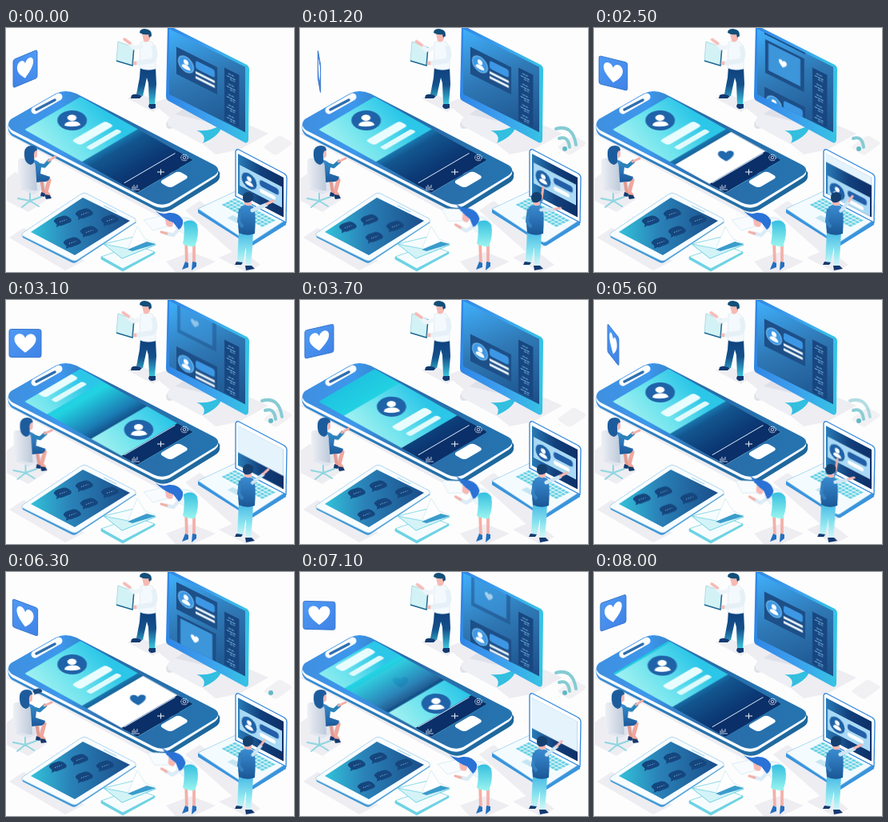
Animation of 360 by 305 pixels, one loop 8100 ms. Source, as an HTML page:

```html
<!DOCTYPE html>
<html lang="en">
<head>
<meta charset="utf-8">
<title>Connected devices</title>
<style>
html, body { margin: 0; width: 100%; height: 100%; overflow: hidden; background: #fdfdfd; }
svg { display: block; width: 100vw; height: 100vh; }
.m { animation: 4.05s linear infinite; }
.phone { animation-name: phone; }
.post { animation-name: post; }
.feed { animation-name: feed; }
.feed-post { animation-name: feed-post; }
.page { animation-name: page; }
.chat { animation-name: chat; }
.last { animation-name: last; transform-box: fill-box; transform-origin: center; }
.sitter { animation-name: sitter; }
.typing { animation-name: typing; transform-origin: 38px 172px; }
.worker { animation-name: worker; }
.reach { animation-name: reach; transform-origin: 310px 228px; }
.raise { animation-name: raise; }
.bend { animation-name: bend; transform-origin: 229px 252px; }
.swipe { animation-name: swipe; }
.dot { animation-name: dot; }
.mid { animation-name: mid; }
.out { animation-name: out; }
@keyframes phone {
  0%, 64% { transform: none; }
  91.4% { transform: translateY(-135px); }
  97.5% { transform: translateY(-176px); }
  100% { transform: translateY(-180px); }
}
@keyframes post {
  0%, 38% { transform: translateY(66px); opacity: 0; }
  39% { transform: translateY(66px); opacity: 1; }
  52%, 66% { transform: none; opacity: 1; }
  76%, 100% { transform: none; opacity: 0; }
}
@keyframes feed {
  0%, 49% { transform: none; }
  55.6% { transform: translateY(-11px); }
  61.7% { transform: translateY(-50px); }
  91.4% { transform: translateY(-81px); }
  97.5% { transform: translateY(-99px); }
  100% { transform: translateY(-100px); }
}
@keyframes feed-post {
  0%, 48% { opacity: 0; }
  53%, 70% { opacity: 1; }
  82%, 100% { opacity: 0; }
}
@keyframes page {
  0%, 10% { transform: none; }
  20% { transform: translateY(54px); opacity: 1; }
  20.1%, 22% { transform: translateY(54px); opacity: 0; }
  22.1% { transform: translateY(54px); opacity: 1; }
  29% { transform: translateY(-3px); }
  40%, 57% { transform: none; }
  61.7% { transform: translateY(13px); }
  72% { transform: translateY(54px); }
  86%, 100% { transform: none; }
}
@keyframes chat {
  0%, 5%, 61.7%, 100% { transform: none; }
  18%, 42% { transform: translate(-11px, 7.5px); }
  55.6% { transform: translate(-6px, 2px); }
}
@keyframes last {
  0%, 5%, 61.7%, 100% { transform: none; }
  18%, 42% { transform: scale(0); }
  55.6% { transform: scale(.55); }
}
@keyframes sitter {
  0%, 100% { transform: translateX(6px); }
  20%, 75% { transform: none; }
  91.4%, 97.5% { transform: translateX(5px); }
}
@keyframes typing {
  0%, 91.4%, 100% { transform: rotate(-7deg); }
  20%, 75% { transform: none; }
}
@keyframes worker {
  0%, 8%, 50%, 100% { transform: none; }
  18%, 38% { transform: translateX(-7px); }
}
@keyframes reach {
  0%, 7%, 92%, 100% { transform: none; }
  18%, 35% { transform: rotate(20deg) scale(.85); }
  53%, 66% { transform: rotate(-27deg) scale(.82); }
}
@keyframes raise {
  0%, 10%, 45%, 100% { opacity: 0; }
  16%, 38% { opacity: 1; }
}
@keyframes bend {
  0%, 23%, 61%, 82%, 97%, 100% { transform: none; }
  29%, 56%, 91.4% { transform: rotate(15deg); }
}
@keyframes swipe {
  0%, 58%, 100% { transform: none; }
  25%, 91.4% { transform: translate(-3px, 3px); }
}
@keyframes dot {
  0%, 5%, 45%, 50%, 82%, 100% { opacity: 0; }
  9%, 40%, 55%, 77% { opacity: 1; }
}
@keyframes mid {
  0%, 10%, 44%, 57%, 82%, 100% { opacity: 0; }
  15%, 38%, 61.5%, 77% { opacity: 1; }
}
@keyframes out {
  0%, 15%, 42%, 65%, 82%, 100% { opacity: 0; }
  20%, 36%, 70%, 77% { opacity: 1; }
}
</style>
</head>
<body>
<svg viewBox="0 0 360 305" preserveAspectRatio="none">
<defs>
  <linearGradient id="bezel"><stop stop-color="#3f8fe0"/><stop offset=".25" stop-color="#3d97ec"/><stop offset=".5" stop-color="#2a6ca8"/><stop offset="1" stop-color="#2474b0"/></linearGradient>
  <linearGradient id="side"><stop stop-color="#3a8fd8"/><stop offset=".4" stop-color="#2a76b0"/><stop offset="1" stop-color="#1c6599"/></linearGradient>
  <linearGradient id="glass" x2="0" y2="1"><stop stop-color="#1fc3e0"/><stop offset=".25" stop-color="#22d3e2"/><stop offset=".5" stop-color="#1b7cb4"/><stop offset=".58" stop-color="#13568f"/><stop offset=".8" stop-color="#0c3a76"/><stop offset="1" stop-color="#082a60"/></linearGradient>
  <linearGradient id="head" y2=".35"><stop stop-color="#a2f1f0"/><stop offset=".45" stop-color="#6ee3ee"/><stop offset="1" stop-color="#2bc6e8"/></linearGradient>
  <linearGradient id="mon" y2="1"><stop stop-color="#40b0fc"/><stop offset=".45" stop-color="#2f79b6"/><stop offset="1" stop-color="#1a4f88"/></linearGradient>
  <linearGradient id="rim"><stop stop-color="#2f86e6"/><stop offset=".5" stop-color="#3d9fee"/><stop offset="1" stop-color="#35c4e4"/></linearGradient>
  <linearGradient id="tab"><stop stop-color="#32c2da"/><stop offset=".4" stop-color="#2a82b8"/><stop offset="1" stop-color="#1a4d8a"/></linearGradient>
  <linearGradient id="cloth" x2="0" y2="1"><stop stop-color="#0f3f7c"/><stop offset=".5" stop-color="#14518c"/><stop offset="1" stop-color="#3cc4dc"/></linearGradient>
  <linearGradient id="pants" x2="0" y2="1"><stop stop-color="#45b8e6"/><stop offset=".6" stop-color="#8fe6f0"/><stop offset="1" stop-color="#d6f8fa"/></linearGradient>
  <linearGradient id="coat" x2="0" y2="1"><stop stop-color="#3a8cd2"/><stop offset="1" stop-color="#1a5796"/></linearGradient>
  <linearGradient id="aqua" x2="0" y2="1"><stop stop-color="#35bfe0"/><stop offset="1" stop-color="#9af5ef"/></linearGradient>
  <linearGradient id="seat"><stop stop-color="#eef0f5"/><stop offset="1" stop-color="#bcc9da"/></linearGradient>
  <linearGradient id="lap"><stop stop-color="#2a7cb8"/><stop offset=".5" stop-color="#12407c"/><stop offset="1" stop-color="#0d2f66"/></linearGradient>
  <linearGradient id="card" x2="1" y2="1"><stop stop-color="#4f9af4"/><stop offset="1" stop-color="#3f82e6"/></linearGradient>
  <clipPath id="phoneClip"><rect width="100" height="200" rx="3"/></clipPath>
  <clipPath id="monClip"><rect width="95" height="82"/></clipPath>
  <clipPath id="lapClip"><rect width="57" height="50"/></clipPath>
  <path id="heart" d="M0 9C-5 5-10 1-10-4C-10-10-2-11 0-5C2-11 10-10 10-4C10 1 5 5 0 9Z"/>
  <g id="person"><circle cy="-2.600" r="3.100"/><path d="M-5.500 5Q-5 .8 0 .8T5.500 5Q0 7.500-5.500 5Z"/></g>
  <g id="user"><circle r="10" fill="#1f62a8"/><use href="#person" fill="#fff"/></g>
  <g id="bubble"><path d="M-11 0Q-12-2-7-5L1-7.500Q5-8 7-6L10-3.500Q12-1 9 1L0 4.500Q-2 5.500-4 5L-8 7L-7.500 3.500Z" fill="#15467e"/><path d="M-4 .5L4.500-2.500" stroke="#7fb8e4" stroke-dasharray="1.300 1.500"/></g>
  <path id="menu" d="M3 0h7M1 3.500h11M5 6h6" stroke="#7cc4ee" stroke-width=".9" stroke-dasharray="3 .8"/>
</defs>

<!-- ground shadows -->
<g fill="#ededf2">
  <path d="M1 188L12 180L52 214L28 230L1 216Z"/>
  <path d="M4 262L22 250L98 291L74 303Z"/>
  <path d="M152 88L164 80L196 96L184 105Z"/>
  <path d="M183 94L212 84L310 124L328 132L292 152L262 158Z"/>
  <path d="M224 228L242 216L316 268L286 283Z"/>
  <path d="M200 292L232 280L262 292L234 305H212Z"/>
  <path d="M266 287L292 276L318 296L300 305Z"/>
  <path d="M0 132L70 96L212 222L192 236Z"/>
  <path d="M324 147L339 136Q342 134 346 136L356 142Q359 144 355 147L341 157Q337 160 333 157L324 151Q321 149 324 147Z" fill="#f1f1f4"/>
</g>

<!-- turning card -->
<g id="turn">
  <rect x="-20" y="-17.500" width="40" height="35" rx="2.500" fill="url(#card)" stroke="#3876cc" vector-effect="non-scaling-stroke"/>
  <use href="#heart" transform="scale(1.350 1.300)" fill="#fff"/>
</g>

<!-- monitor -->
<path d="M222 101L262 119L256 132Q235 122 203 126Q196 120 206 112Z" fill="#dfe1e9"/>
<path d="M203 122Q198 113 212 108L246 116L270 122L257 143Q250 148 243 144Z" fill="#eeeff4"/>
<path d="M238 128Q254 130 270 121Q269 134 246 144Q252 134 238 128Z" fill="#32bfe0"/>
<path d="M202-4L301 46Q304 48 304 52L303 140Q302 145 298 143L203 91Q200 89 200 85Z" fill="url(#rim)"/>
<g transform="matrix(1 .5 0 1 204 1)" clip-path="url(#monClip)">
  <rect width="95" height="82" fill="url(#mon)"/>
  <g class="m feed">
    <g id="profile">
      <rect x="9" y="18" width="51" height="34" fill="#1d4f88"/>
      <circle cx="21" cy="34" r="9.500" fill="#3d97e4" stroke="#7cc6f4"/>
      <use href="#person" x="21" y="34" fill="#fff"/>
      <rect x="33" y="23" width="24" height="10" rx="3" fill="#3d97e4"/>
      <path d="M33 38H57M33 44H57" stroke="#f2faff" stroke-width="3.200"/>
    </g>
    <use href="#profile" y="100"/>
    <g class="m feed-post">
      <rect x="10" y="58" width="49" height="42" fill="#1d4f88"/>
      <rect x="14" y="61" width="40" height="34" fill="#3d95da"/>
      <use href="#heart" transform="translate(32 78) scale(.5)" fill="#fff"/>
    </g>
  </g>
  <rect x="69" y="14" width="18" height="66" fill="#184680"/>
  <g transform="translate(71 19)">
    <use href="#menu"/><use href="#menu" y="13"/><use href="#menu" y="26"/><use href="#menu" y="39"/><use href="#menu" y="52"/>
  </g>
</g>

<!-- man with a sheet -->
<path d="M168 48L187 49L188 70L186 95L179 95L178 69L176 62L171 85L163 83L167 62Z" fill="url(#cloth)"/>
<path d="M157 84Q162 81 170 85L167 88H156ZM179 95L187 95V100Q180 103 178 98Z" fill="#123a72"/>
<path d="M168 18Q175 14 183 18Q188 23 187 51Q176 54 167 50Z" fill="#f3f9fd" stroke="#d3e2ee" stroke-width=".6"/>
<path d="M184 22Q189 36 183 41L162 44" fill="none" stroke="#e6f0f7" stroke-width="6" stroke-linejoin="round"/>
<path d="M140 17L160 24L158 47L138 41Z" fill="#d3f2f5" stroke="#9fd3de" stroke-width=".8"/>
<path d="M160 24L158 47L138 41" fill="none" stroke="#1f6a94" stroke-width="1.500"/>
<circle cx="161" cy="44" r="2.500" fill="#f6b9b4"/>
<g class="m swipe">
  <path d="M171 22L160 25L153 18" fill="none" stroke="#edf5fa" stroke-width="5" stroke-linejoin="round"/>
  <path d="M155 19L148 14" stroke="#f6b9b4" stroke-width="3.500" stroke-linecap="round"/>
</g>
<path d="M170 7H180V14Q176 20 172 16Z" fill="#f6b9b4"/>
<path d="M167 6Q167 1 174 1Q183 2 182 10L179 12L178 8Q172 9 167 6Z" fill="#124e78"/>

<!-- signal -->
<g fill="none" stroke="#86cbd4" stroke-width="4" stroke-linecap="round">
  <circle class="m dot" cx="331" cy="151" r="3" fill="#62b8c6" stroke="none"/>
  <path class="m mid" d="M324 138Q335 134 337 149"/>
  <path class="m out" d="M320 126Q341 120 345 146"/>
</g>

<!-- phone -->
<path d="M5 120L62 88L260 177Q269 178 267 184Q268 190 261 194L207 227Q196 233 184 226L8 135Q1 130 3 120Z" fill="url(#side)"/>
<path d="M6 117L62 85Q74 79 88 85L260 174Q270 180 261 187L207 221Q196 228 184 222L8 132Q-1 125 6 117Z" fill="#f8fcff"/>
<path d="M6 114L62 82Q74 76 88 82L260 171Q270 177 261 184L207 217Q196 224 184 218L8 128Q-1 121 6 114Z" fill="url(#bezel)"/>
<path d="M36 103L66 86" stroke="#fdfdfd" stroke-width="9" stroke-linecap="round"/>
<path d="M38 102L61 90" stroke="#2f6fb0" stroke-width="3.500" stroke-linecap="round"/>
<g transform="matrix(.7 -.41 .705 .395 23 127)">
  <rect x="36" y="203" width="34" height="20" rx="6" fill="#fff"/>
  <g clip-path="url(#phoneClip)">
    <rect width="100" height="200" fill="url(#glass)"/>
    <g class="m phone">
      <g id="account">
        <rect width="100" height="102" fill="url(#head)"/>
        <use href="#user" transform="translate(56 29) rotate(43) scale(1.850 2.200)"/>
        <rect x="24" y="60" width="60" height="15" rx="5" fill="#e9fdff"/>
        <rect x="26" y="83" width="56" height="9" rx="3" fill="#e0fafc"/>
      </g>
      <use href="#account" y="180"/>
      <g class="m post">
        <rect y="111" width="100" height="62" fill="#fff"/>
        <use href="#heart" transform="translate(58 144) rotate(43) scale(1 1.300)" fill="#1f68ad"/>
      </g>
    </g>
    <rect y="172" width="100" height="28" fill="#0b2f68"/>
    <path d="M4 173H95" stroke="#d8eaff" stroke-width="1.300"/>
  </g>
</g>
<g fill="none" stroke="#eaf4ff">
  <path d="M189 180H198M193.500 176.500V183.500"/>
  <path d="M158 201V198M160 201V196M162 201V198M164 200V196M157 202H167" stroke-width=".8"/>
  <ellipse cx="223" cy="162" rx="4.300" ry="3.800" stroke-dasharray="2 .8"/><circle cx="223" cy="162" r="1.800" stroke-width=".8"/>
</g>

<!-- woman on a chair -->
<g class="m sitter">
  <g fill="none" stroke="#8ed6e0" stroke-width="2" stroke-linecap="round">
    <path d="M24 205V216M24 216L9 213M24 216L38 211M24 216L14 224M24 216L35 223"/>
  </g>
  <path d="M20 190L41 190L45 200L28 208L12 201Z" fill="#dfe5ee"/>
  <path d="M34 186L48 190L44 205L48 210" fill="none" stroke="#f0a79c" stroke-width="5" stroke-linejoin="round"/>
  <path d="M38 187L41 207" stroke="#e39a92" stroke-width="4"/>
  <path d="M42 208L49 209L51 213L44 214ZM38 205L43 207L42 211L37 210Z" fill="#14396f"/>
  <path d="M26 165Q36 164 38 174L37 182L49 186Q48 193 40 192L25 194Z" fill="url(#coat)"/>
  <path d="M9 166Q10 162 16 163L27 166Q31 168 31 174L33 203Q24 204 14 198Q10 196 9 190Z" fill="url(#seat)"/>
  <g class="m typing">
    <path d="M33 170L42 173L50 166" fill="none" stroke="#2a82ba" stroke-width="4.500" stroke-linejoin="round"/>
    <path d="M48 167L57 163" stroke="#f3b0a8" stroke-width="3" stroke-linecap="round"/>
  </g>
  <path d="M25 151H33V160Q30 165 26 161Z" fill="#f6b9b4"/>
  <path d="M17 155Q18 147 26 147Q33 147 33 153Q28 153 29 162Q31 169 25 171Q16 169 17 155Z" fill="#1d5c9c"/>
</g>

<!-- tablet -->
<path d="M20 259L96 211L163 243L89 292Q86 295 82 293L21 262Z" fill="#3d97d4"/>
<path d="M21 256L93 208Q97 205 101 207L161 238Q164 241 161 243L89 290Q86 292 82 290L21 260Q18 258 21 256Z" fill="#f7fcff" stroke="#9ecbe9" stroke-width=".8"/>
<path d="M31 255L96 212L155 241L86 284Z" fill="url(#tab)"/>
<path d="M122 222L138 230" stroke="#a9d7ee" stroke-width="1.300"/>
<g class="m chat">
  <use href="#bubble" x="71" y="242"/><use href="#bubble" x="98" y="233"/>
  <use href="#bubble" x="104" y="255"/><use href="#bubble" x="130" y="241"/>
  <use href="#bubble" class="m last" x="83" y="269"/>
</g>

<!-- letters -->
<g stroke="#6fd2e4" stroke-width=".8" fill="#f6fcfd">
  <path d="M119 286L162 271L186 280L146 301Z"/>
  <path d="M119 286L146 301L186 280V282L146 304L119 289Z" fill="#6ad3e4"/>
  <path d="M122 270L164 260L187 271L145 288Z"/>
  <path d="M122 270L158 277L187 271L145 288Z" fill="#d3f3f7"/>
  <path d="M164 248L174 264L187 269L152 277Z" fill="#fff" stroke="#cdeaf0"/>
  <path d="M152 277L176 267L187 270L158 279Z" fill="#3a9ccc" stroke="none"/>
</g>

<!-- woman bending -->
<path d="M225 264L226 296M235 264L235 296" stroke="#f3b0a8" stroke-width="3.800"/>
<path d="M224 292L228 294L228 299L220 302ZM233 292L238 293L238 298L232 303Z" fill="#2370c0"/>
<g class="m bend">
  <path d="M172 240L194 235L205 247L184 253Z" fill="#f8fcfe" stroke="#d5e8f0" stroke-width=".8"/>
  <path d="M214 238Q230 234 238 244L236 256L222 257L212 250Z" fill="#eef7fc" stroke="#c9dfea" stroke-width=".6"/>
  <path d="M219 248L209 259L198 256" fill="none" stroke="#dcebf5" stroke-width="4.500" stroke-linejoin="round"/>
  <path d="M201 257L194 255" stroke="#f3b0a8" stroke-width="3" stroke-linecap="round"/>
  <path d="M199 238L210 240L208 248Q203 250 200 246Z" fill="#f6b9b4"/>
  <path d="M187 229Q196 234 203 231Q216 230 221 240Q222 248 216 252L209 243Q199 240 187 229Z" fill="#2a72d6"/>
</g>
<path d="M222 243Q233 237 239 246Q242 258 236 273Q228 274 221 270Q224 256 222 243Z" fill="url(#aqua)"/>

<!-- laptop -->
<path d="M240 227L286 206L350 241V246L308 272Q305 273 302 270L240 231Z" fill="#3a94dc"/>
<path d="M240 226L287 204L351 239L308 267Q305 269 302 267Z" fill="#f4fbff" stroke="#8ec8e8" stroke-width=".7"/>
<path d="M287 154Q288 151 291 152L348 182Q351 184 351 188L350 243L287 210Z" fill="#fff" stroke="#2f86dc" stroke-width="1.300"/>
<g transform="matrix(1 .52 0 1 290 157)" clip-path="url(#lapClip)">
  <rect width="57" height="50" fill="url(#lap)"/>
  <g class="m page">
    <rect y="-54" width="57" height="51" fill="#e4f3fc"/>
    <rect x="2" y="13" width="53" height="26" fill="#a9d9f4"/>
    <use href="#user" transform="translate(14 27) scale(.95)"/>
    <rect x="27" y="18" width="24" height="8" rx="3.500" fill="#235fa8"/>
    <rect x="27" y="29" width="20" height="5" rx="2.500" fill="#fff"/>
  </g>
</g>
<g transform="matrix(.86 .47 -.86 .43 286 211)" fill="none" stroke="#62cfe2" stroke-width="3.800" stroke-dasharray="4 1">
  <path d="M2 4H62M2 9H62M2 14H62M2 19H62"/>
  <path d="M24 31H41" stroke="#c4e6f2" stroke-width="8" stroke-dasharray="none"/>
</g>

<!-- man at the laptop -->
<g class="m worker">
  <path d="M291 254H309L308 274L306 298H300L300 273L296 294H289Z" fill="url(#pants)"/>
  <path d="M288 292L296 293L294 296L286 296ZM299 297H307L311 301L300 303Z" fill="#14396f"/>
  <g class="m raise">
    <path d="M302 226L309 213" stroke="#4a90d0" stroke-width="5"/>
    <path d="M309 213L311 199" stroke="#f3b0a8" stroke-width="3" stroke-linecap="round"/>
  </g>
  <path d="M294 223Q301 219 309 223Q313 228 311 257Q301 261 291 256Q288 232 294 223Z" fill="url(#coat)"/>
  <path d="M293 226L291 242L296 249" fill="none" stroke="#3480c0" stroke-width="4" stroke-linejoin="round"/>
  <g class="m reach">
    <path d="M308 228L325 221" stroke="#cfe6f4" stroke-width="5" stroke-linecap="round"/>
    <path d="M326 220L334 216" stroke="#f6b9b4" stroke-width="3.500" stroke-linecap="round"/>
  </g>
  <path d="M298 212H307V221Q302 224 298 220Z" fill="#f6b9b4"/>
  <path d="M296 212Q296 205 303 205Q311 206 309 214Q306 219 299 218Q296 216 296 212Z" fill="#14406f"/>
</g>
</svg>
<script>
const PERIOD = 4050;
const card = document.getElementById('turn');
const start = performance.now();

// The card makes half a revolution per period; both faces look alike.
function draw() {
  const phase = (performance.now() - start) % PERIOD / PERIOD;
  const angle = Math.PI * (phase - 0.77);
  const lean = -0.47 * Math.sin(angle);
  const y = 54 - 3 * Math.sin(2 * angle);
  card.setAttribute('transform', `matrix(${Math.cos(angle)} ${lean} 0 1 24 ${y})`);
  requestAnimationFrame(draw);
}
draw();
</script>
</body>
</html>
```
